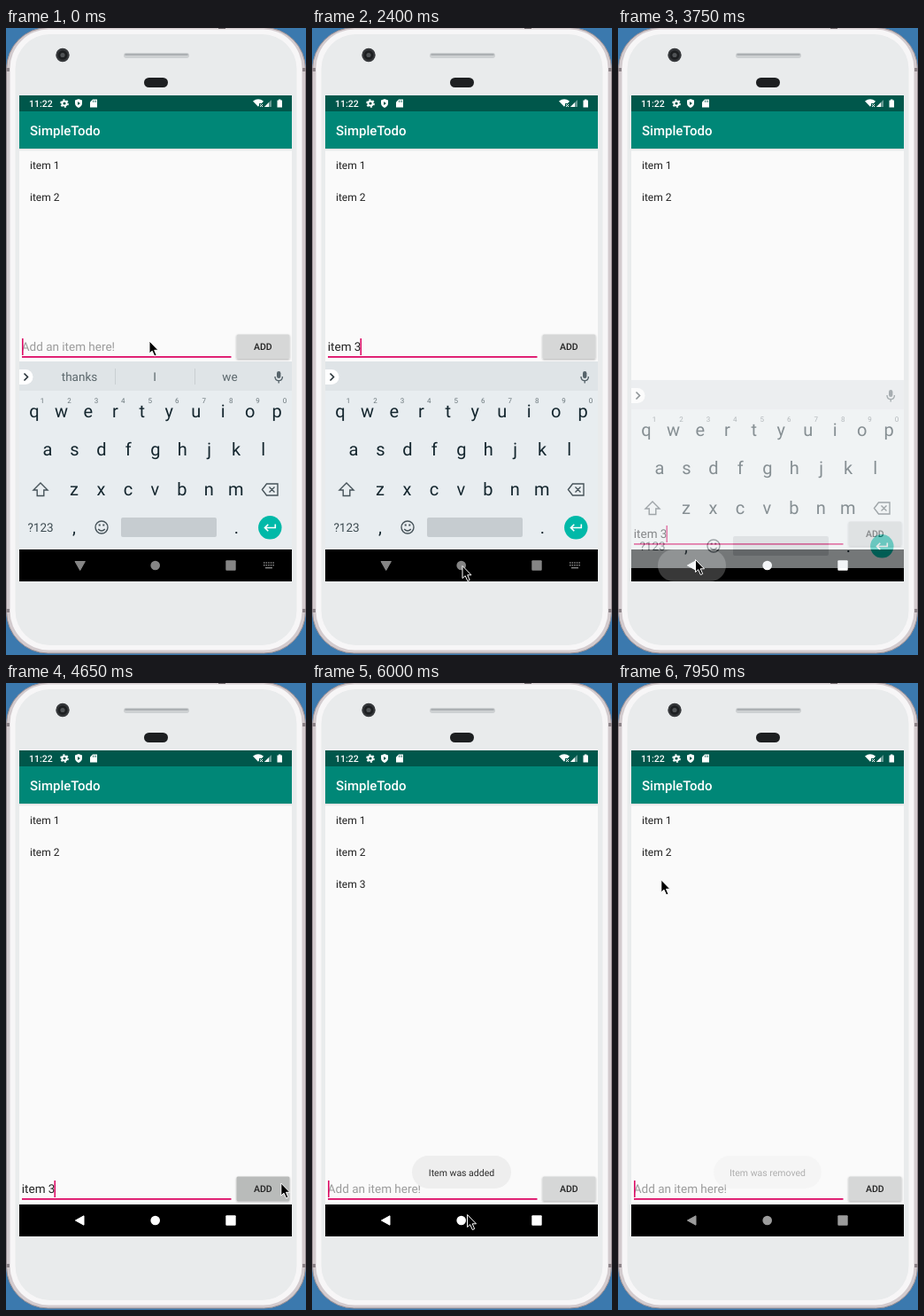
An HTML page that plays this animation: 339x707 px, repeating every 8000 ms.

```html
<!DOCTYPE html>
<html lang="en">
<head>
<meta charset="utf-8">
<title>Todo app</title>
<style>
html, body { margin: 0; width: 100%; height: 100%; overflow: hidden; background: #3b79ae; }
svg { display: block; width: 339px; height: 707px; font-family: Roboto, "Open Sans", sans-serif; }
text { white-space: pre; text-rendering: geometricPrecision; }
.mid { text-anchor: middle; }
.key { font-size: 20px; fill: #14262e; text-anchor: middle; }
.digit { font-size: 8px; fill: #6a767b; text-anchor: middle; }
.word { font-size: 13.5px; fill: #5b676c; text-anchor: middle; }
.item { font-size: 12px; fill: #212121; }
.line { fill: none; stroke: #465359; stroke-width: 1.4; }
</style>
</head>
<body>
<svg viewBox="0 0 339 707">
  <defs>
    <linearGradient id="fade" x2="0" y2="1">
      <stop offset="0" stop-color="#000" stop-opacity=".12"/>
      <stop offset="1" stop-color="#000" stop-opacity="0"/>
    </linearGradient>
    <filter id="soft" x="-20%" y="-30%" width="140%" height="180%">
      <feDropShadow dx="0" dy="1" stdDeviation=".8" flood-opacity=".3"/>
    </filter>
    <clipPath id="screen"><rect x="15" y="76" width="308" height="548"/></clipPath>
  </defs>

  <!-- phone -->
  <rect width="339" height="707" fill="#3b79ae"/>
  <rect x=".5" y="-.5" width="338" height="705.5" rx="47" fill="#d3cbce" stroke="#978d92"/>
  <path d="M0 47h4M335 47h4M0 657h4M335 657h4" stroke="#8d8489" stroke-width="4"/>
  <path d="M240 0h8" stroke="#6f676b" stroke-width="2"/>
  <rect x="4.5" y="1.5" width="330" height="700" rx="44" fill="#f7f6f7"/>
  <rect x="10.5" y="7" width="318" height="689" rx="39" fill="#e9ebec"/>
  <circle cx="64" cy="30.5" r="7.7" fill="#35373a"/>
  <circle cx="64" cy="30.5" r="5.3" fill="#1d1f21"/>
  <circle cx="64" cy="30.5" r="2.6" fill="#505356"/>
  <rect x="133" y="28" width="74" height="6" rx="3" fill="#cdd0d2"/>
  <path d="M135 30H205" stroke="#a2a6a9" stroke-width="1.6" stroke-linecap="round"/>
  <rect x="156" y="56" width="27" height="11" rx="5.5" fill="#1d1f21"/>

  <g clip-path="url(#screen)">
    <rect x="15" y="76" width="308" height="548" fill="#fafafa"/>
    <rect x="15" y="136" width="308" height="3" fill="url(#fade)"/>
    <rect x="15" y="94" width="308" height="42" fill="#008777"/>
    <rect x="15" y="76" width="308" height="18" fill="#00574b"/>
    <text x="26" y="89" font-size="10.5" font-weight="500" fill="#fff">11:22</text>
    <g fill="#fff">
      <circle cx="66" cy="85" r="2.6" fill="none" stroke="#fff" stroke-width="2"/>
      <circle cx="66" cy="85" r="4.1" fill="none" stroke="#fff" stroke-width="1.5" stroke-dasharray="2.1 2.19"/>
      <path d="M82 80l4 1.6v3.2q0 3.6-4 5.2q-4-1.6-4-5.2v-3.2z"/>
      <path d="M81 83l3 2-3 2z" fill="#00574b"/>
      <path d="M98 80.5h5v9h-8v-6z"/>
      <path d="M98.3 81.7v2M100 81.7v2M101.6 81.7v2" stroke="#00574b" stroke-width=".7"/>
      <path d="M279 82.5q6-4.5 12 0l-2 2.4h-3v2.4l-1 1.5z"/>
      <path d="M287 86l3 3m0-3l-3 3" stroke="#fff"/>
      <path d="M300 81v8h-8z" opacity=".4"/>
      <path d="M297 84v5h-5z"/>
      <path d="M306.5 81.5h1.5v-1h2.5v1h1.5v8h-5.5z"/>
    </g>
    <text x="27" y="121" font-size="15" font-weight="500" fill="#fff">SimpleTodo</text>

    <text class="item" x="27" y="158.5">item 1</text>
    <text class="item" x="27" y="194.5">item 2</text>
    <text class="item" x="27" y="230.5" id="third">item 3</text>

    <g id="entry">
      <text id="field" x="17.8" y="364.4" font-size="13.5"></text>
      <path id="compose" stroke="#212121" stroke-width="1"/>
      <rect x="18" y="370" width="236.5" height="1.8" fill="#dd0c66"/>
      <rect id="caret" y="350" width="1.6" height="19" fill="#dd0c66"/>
      <rect id="button" x="260.5" y="345.5" width="60" height="27.5" rx="1.5" filter="url(#soft)"/>
      <text class="mid" x="290.3" y="362.8" font-size="10.5" font-weight="500" fill="#212121">ADD</text>
    </g>

    <g id="toast">
      <rect id="pill" y="533" height="37" rx="18.5" fill="#eeeeee"/>
      <text id="note" class="mid" x="169" y="555.8" font-size="10.5" fill="#2b2b2b"></text>
    </g>

    <!-- navigation bar -->
    <rect x="15" y="588" width="308" height="36" fill="#000"/>
    <rect id="ripple" x="45" y="588" width="77" height="36" rx="18" fill="#fff"/>
    <g id="nav">
      <path id="back" stroke-width="1" stroke-linejoin="round"/>
      <circle cx="168.7" cy="606" r="5.3"/>
      <rect x="248.3" y="600.3" width="11.4" height="11.4" rx="1"/>
      <g id="switcher" fill="none" stroke="#858585">
        <path d="M291 603h12M291 605.7h12" stroke-width="1.5" stroke-dasharray="1.5 1.1"/>
        <path d="M293 608.7h8" stroke-width="1.4"/>
      </g>
    </g>

    <g id="keyboard">
      <rect x="15" y="376" width="308" height="33.5" fill="#dfe4e7"/>
      <rect x="15" y="409" width="308" height="179" fill="#e8edf0"/>
      <path d="M15 385h7a8.5 8.5 0 0 1 0 17h-7z" fill="#fff"/>
      <path class="line" d="M20.5 389.5l4 4-4 4" style="stroke:#263238;stroke-width:1.6"/>
      <g id="words"></g>
      <rect x="306" y="387" width="4.4" height="8" rx="2.2" fill="#56636a"/>
      <path class="line" d="M304 393q0 4.6 4.2 4.6t4.2-4.6M308.2 397.6v3" style="stroke:#56636a"/>
      <g id="keys"></g>
      <path class="line" d="M39 513l8 8h-4.2v6.5h-7.6v-6.5H31z"/>
      <path class="line" d="M289.5 520.5l5-6.5h12.5v13h-12.5zM297.5 517.5l6 6m0-6l-6 6"/>
      <text class="mid" x="39" y="568" font-size="13.5" fill="#3c4a50">?123</text>
      <circle class="line" cx="108" cy="563" r="7"/>
      <path class="line" d="M104.2 565q3.8 4 7.6 0"/>
      <path d="M104.7 560.5h2M109.3 560.5h2" stroke="#465359" stroke-width="2"/>
      <rect x="130" y="552" width="108" height="22" rx="2" fill="#c6ccd0"/>
      <circle cx="298.3" cy="563.3" r="13.2" fill="#00b9a8"/>
      <path d="M304.3 559.5v4H292.5m3.8-3.8l-3.8 3.8 3.8 3.8" fill="none" stroke="#fff" stroke-width="1.6"/>
    </g>
  </g>

  <path id="cursor" d="M0 0V14L3.2 11.2L5.8 17L8.2 16L5.7 10.3H10Z" fill="#000" stroke="#fff" stroke-width="1" stroke-linejoin="round"/>
</svg>
<script>
const LOOP = 8000, STEP = 150;
const $ = id => document.getElementById(id);
const set = (id, attrs) => {
  for (const k in attrs) $(id).setAttribute(k, attrs[k]);
};
const label = (cls, x, y, s) => `<text class="${cls}" x="${x}" y="${y}">${s}</text>`;

// Latest [time, ...values] entry at or before t
const at = (track, t) => track.filter(k => k[0] <= t).pop().slice(1);

const rows = [["qwertyuiop", 32, 438.5], ["asdfghjkl", 47, 482], ["zxcvbnm", 77, 526.5]];
$("keys").innerHTML = rows.map(([chars, x, y], r) =>
  [...chars].map((c, i) => {
    const kx = x + i * 30.45;
    return label("key", kx, y, c) + (r ? "" : label("digit", kx + 9, 423, (i + 1) % 10));
  }).join("")).join("") + label("key", 77, 569.5, ",") + label("key", 260.5, 569.5, ".");

const typed = [[0, ""], [450, "i"], [600, "it"], [900, "item"], [1200, "item "], [1350, "item 3"], [4800, ""]];
const hints = [[0, "thanks", "I", "we"], [450, "I", "is", "in"], [750, "it", "its", "it's"],
  [1050, "item", "items", "itemized"], [1350]];
const pointer = [
  [0, 162, 353], [1650, 180, 440], [1800, 206, 548], [1950, 219, 620], [2100, 206, 637],
  [2250, 182, 618], [2400, 170, 606.5], [3150, 146, 606], [3300, 108, 602], [3450, 87.5, 599.5],
  [3900, 140, 590], [4050, 236, 569], [4200, 288, 565], [4350, 310.8, 564],
  [5250, 300, 563], [5400, 270, 570], [5550, 231, 584], [5700, 197, 595], [5850, 179, 600],
  [6000, 175.5, 599.5], [6300, 200, 604], [6450, 262, 566], [6600, 270, 480], [6750, 198, 358],
  [6900, 112, 270], [7050, 64, 232], [7200, 52, 224], [7350, 48.8, 222]];
const board = [[0, 0, 1], [3600, 4, .9], [3750, 21, .5], [3900, 40, 0]];
const ripple = [[0, 0], [3450, .12], [3600, .22], [3900, .1], [4050, 0]];
const toast = [[0, 0], [4950, .4], [5100, .85], [5250, 1], [6900, .7], [7050, .3], [7200, 0], [7950, .36]];
const navTone = [[0, "#858585"], [3450, "#fff"], [6900, "#d0d0d0"], [7050, "#9c9c9c"]];

function render(time) {
  const t = Math.floor(time / STEP) * STEP;

  const [text] = at(typed, t);
  const field = $("field");
  field.textContent = text || "Add an item here!";
  field.setAttribute("fill", text ? "#212121" : "#9b9b9b");
  const width = text ? field.getComputedTextLength() : 0;
  const composing = text && t < 1200;
  set("compose", { d: composing ? `M18 366.5h${width}` : "" });

  const blinkStart = t < 4800 ? 1350 : 4650;
  const lit = t < 1350 || Math.floor((t - blinkStart) / 500) % 2 === 0;
  set("caret", { x: 18 + Math.max(0, width - 1.2), opacity: +lit });
  set("entry", { transform: `translate(0 ${t < 3600 ? 0 : 211})` });
  set("button", { fill: t >= 4500 && t < 4950 ? "#b9bbba" : "#d6d7d7" });
  set("third", { opacity: +(t >= 4800 && t < 7950) });

  const removed = t >= 7950;
  $("note").textContent = removed ? "Item was removed" : "Item was added";
  set("pill", { x: removed ? 108 : 113, width: removed ? 122 : 112 });
  set("toast", { opacity: at(toast, t)[0] });

  const words = at(hints, t);
  $("words").innerHTML = words.map((w, i) => label("word", [83, 168, 253][i], 398.3, w)).join("") +
    (words.length ? '<path d="M123.5 384v18M213.5 384v18" stroke="#c9cfd2"/>' : "");

  const [drop, alpha] = at(board, t);
  set("keyboard", { transform: `translate(0 ${drop})`, opacity: alpha });
  const tone = at(navTone, t)[0];
  set("nav", { fill: tone });
  set("back", { stroke: tone, d: t < 3600 ? "M78 601.5h11.4l-5.7 10z" : "M88 600.8v10.4l-9.6-5.2z" });
  set("switcher", { opacity: +(t < 3600) });
  set("ripple", { opacity: at(ripple, t)[0] });

  const [x, y] = at(pointer, t);
  set("cursor", { transform: `translate(${x} ${y})` });
}

const start = performance.now();
function tick() {
  render((performance.now() - start) % LOOP);
  requestAnimationFrame(tick);
}
tick();
</script>
</body>
</html>
```
